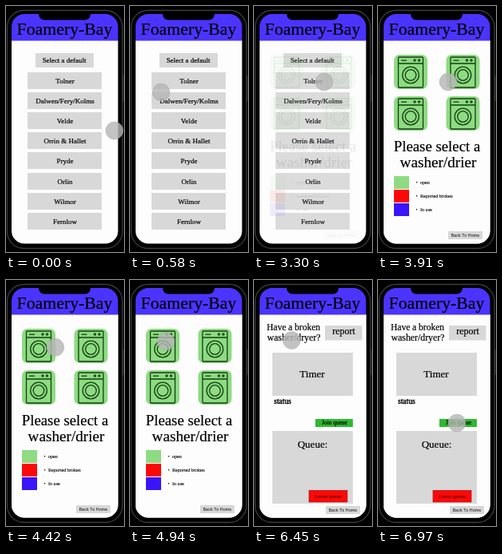
An HTML page with a canvas for the animation above (7 s loop, 148x308 px).

```html
<!DOCTYPE html>
<html lang="en">
<head>
<meta charset="utf-8">
<title>Laundry prototype</title>
<style>
html, body { margin: 0; width: 100%; height: 100%; overflow: hidden; background: #000; }
canvas { display: block; width: 148px; height: 308px; }
</style>
</head>
<body>
<canvas id="stage"></canvas>
<script>
const W = 148, H = 308, LOOP = 7000;
const SERIF = '"Liberation Serif", serif';
const SANS = 'Inter, "Liberation Sans", sans-serif';
const PAPER = '#fdfdfd', GRAY = '#d8d8d8', GREEN = '#8edb83', RED = '#fd0808', BLUE = '#3a14fb';
const LINE = '#12400f';
const HALLS = ['Tolner', 'Dalwen/Fery/Kolms', 'Velde', 'Orrin & Hallet',
               'Pryde', 'Orlin', 'Wilmor', 'Fernlow'];

const canvas = document.getElementById('stage');
const ctx = canvas.getContext('2d');
const dpr = window.devicePixelRatio || 1;
canvas.width = W * dpr;
canvas.height = H * dpr;

function box(x, y, w, h, color) {
  ctx.fillStyle = color;
  ctx.fillRect(x, y, w, h);
}

function roundBox(x, y, w, h, r) {
  ctx.beginPath();
  ctx.roundRect(x, y, w, h, r);
}

function circle(x, y, r) {
  ctx.beginPath();
  ctx.arc(x, y, r, 0, Math.PI * 2);
}

function text(str, x, y, size, { align = 'center', font = SERIF, color = '#000', weight = 0.2 } = {}) {
  ctx.font = `${size}px ${font}`;
  ctx.textAlign = align;
  ctx.fillStyle = ctx.strokeStyle = color;
  ctx.lineWidth = weight;
  ctx.fillText(str, x, y);
  if (weight) ctx.strokeText(str, x, y);
}

function homeButton(x, y) {
  box(x, y, 43, 10, GRAY);
  text('Back To Home', x + 21.5, y + 7, 5.2, { font: SANS, weight: 0 });
}

function hallPage() {
  box(37, 59, 73, 18, GRAY);
  text('Select a default', 73, 71, 8.9);
  HALLS.forEach((name, i) => {
    const y = Math.round(83 + i * 25.1);
    box(27, y, 93, 21, GRAY);
    text(name, 74, y + 13.5, 9);
  });
}

function washer(x, y) {
  ctx.fillStyle = GREEN;
  roundBox(x, y, 42, 43, 7);
  ctx.fill();
  ctx.strokeStyle = LINE;
  ctx.lineWidth = 1.3;
  roundBox(x + 5.5, y + 3, 31, 38, 1);
  ctx.moveTo(x + 5.5, y + 11);
  ctx.lineTo(x + 36.5, y + 11);
  ctx.stroke();
  for (const r of [10.3, 6.8]) {
    circle(x + 21, y + 25.5, r);
    ctx.stroke();
  }
  box(x + 9, y + 6.5, 7, 1.3, LINE);
  for (const dx of [26, 31.5]) {
    circle(x + dx, y + 7, 1.1);
    ctx.stroke();
  }
}

function washerPage() {
  for (const y of [61, 113]) for (const x of [20, 85.5]) washer(x, y);
  text('Please select a', 74, 182, 18.8);
  text('washer/drier', 75.5, 202, 19.2);
  [['open', GREEN], ['Reported broken', RED], ['In use', BLUE]].forEach(([label, color], i) => {
    const y = 213 + i * 17;
    box(20, y, 19, 16, color);
    text('•', 47.5, y + 10, 6, { align: 'left', weight: 0.1 });
    text(label, 53, y + 10, 6.1, { align: 'left', weight: 0.1 });
  });
  homeButton(88, 282);
}

function machinePage() {
  text('Have a broken', 49.5, 63, 11.5);
  text('washer/dryer?', 50, 75.5, 11.8);
  box(89, 57, 46.5, 18.5, GRAY);
  text('report', 112.5, 67.5, 12);
  box(23, 91, 101, 54, GRAY);
  text('Timer', 73, 122, 13);
  text('status', 25, 155, 9.5, { align: 'left', weight: 0.4 });
  box(77, 174, 47, 10, '#2fb92f');
  text('Join queue', 101, 181, 7.4);
  box(23, 189, 101, 91, GRAY);
  text('Queue:', 73.5, 210, 13);
  box(69, 263.5, 48, 14.5, RED);
  ctx.strokeStyle = '#a51010';
  ctx.lineWidth = 0.7;
  ctx.strokeRect(69, 263.5, 48, 14.5);
  text('Leave queue', 93, 273, 6.5, { color: '#6e0808' });
  homeButton(90, 283);
}

const pages = [
  { start: 0, fade: 0, draw: hallPage },
  { start: 3280, fade: 300, draw: washerPage },
  { start: 5650, fade: 180, draw: machinePage }
];

// Pointer stops: time, x, y
const path = [
  [0, 136, 156], [570, 39, 108],
  [1040, 39, 108], [1400, 84, 77], [1760, 88, 112], [1940, 88, 95],
  [4010, 88, 95], [4740, 44, 77], [4940, 45, 77],
  [6430, 47, 75], [6960, 99, 179], [LOOP, 99, 179]
];

const clamp = v => Math.max(0, Math.min(1, v));
const smooth = v => v * v * (3 - 2 * v);

function pointerAt(t) {
  const i = path.findIndex((p, n) => n > 0 && t <= p[0]);
  const [t0, x0, y0] = path[i - 1], [t1, x1, y1] = path[i];
  const k = smooth((t - t0) / (t1 - t0));
  return [x0 + (x1 - x0) * k, y0 + (y1 - y0) * k];
}

function drawPhone() {
  box(0, 0, W, H, '#000');
  box(146, 87, 1.5, 32, '#333');
  ctx.strokeStyle = '#3c3c3c';
  ctx.lineWidth = 1.3;
  roundBox(1.5, 5.5, 144.5, 298, 21);
  ctx.stroke();
}

function drawHeader() {
  box(7, 9, 134, 34.5, '#4b34ff');
  text('Foamery-Bay', 73.5, 35.5, 21.8);
  ctx.fillStyle = '#000';
  roundBox(41, 4, 65, 13.5, [0, 0, 7, 7]);
  ctx.fill();
}

function drawPages(t) {
  for (const { start, fade, draw } of pages) {
    if (t < start) break;
    ctx.globalAlpha = fade ? clamp((t - start) / fade) : 1;
    box(7, 43, 134, 256, PAPER);
    draw();
  }
  ctx.globalAlpha = 1;
}

function drawPointer(t) {
  const [x, y] = pointerAt(t);
  circle(x, y, 11);
  ctx.fillStyle = 'rgba(182,182,182,0.82)';
  ctx.fill();
  ctx.strokeStyle = 'rgba(150,150,150,0.4)';
  ctx.lineWidth = 0.7;
  ctx.stroke();
}

function render(t) {
  ctx.setTransform(dpr, 0, 0, dpr, 0, 0);
  drawPhone();
  ctx.save();
  roundBox(7, 10, 133.5, 287.5, 16);
  ctx.clip();
  drawPages(t);
  drawHeader();
  ctx.restore();
  drawPointer(t);
}

const began = performance.now();
function tick() {
  render((performance.now() - began) % LOOP);
  requestAnimationFrame(tick);
}
tick();
</script>
</body>
</html>
```
